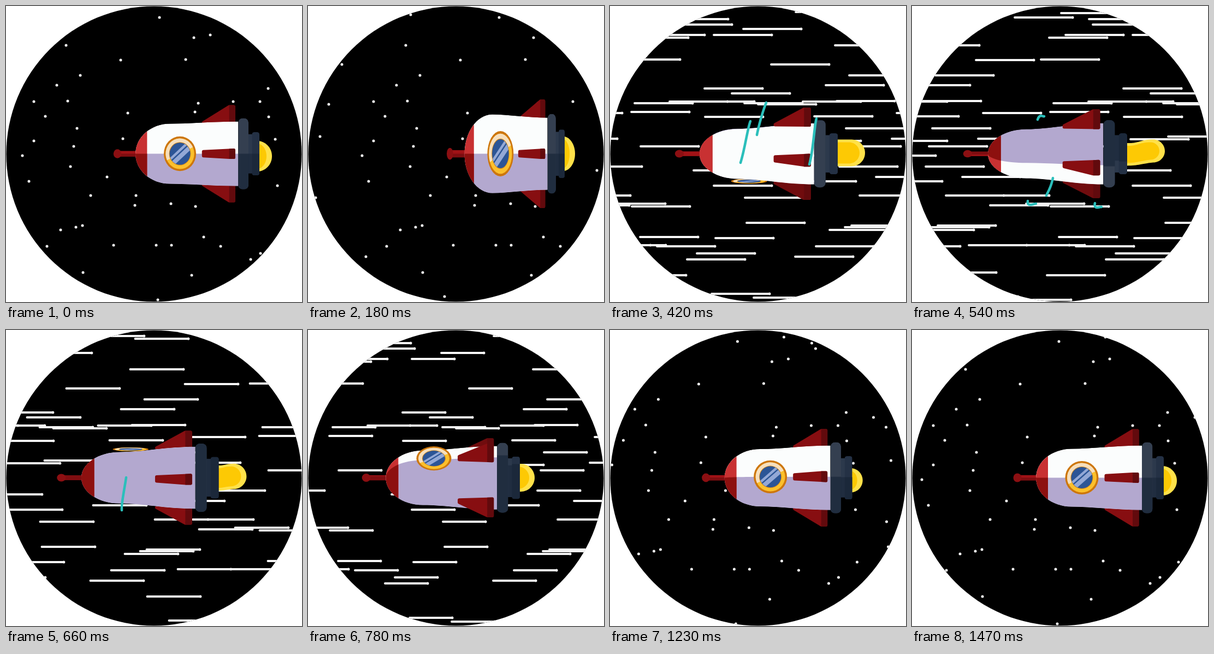
Animation of 542x542 px, one loop 1.53 s. Source, as an HTML page with a canvas:

```html
<!DOCTYPE html>
<html lang="en">
<head>
<meta charset="utf-8">
<title>Rocket</title>
<style>
html, body { margin: 0; width: 100%; height: 100%; overflow: hidden; background: #fff; }
canvas { display: block; width: 542px; height: 542px; }
</style>
</head>
<body>
<canvas id="stage" width="542" height="542"></canvas>
<script>
const ctx = document.getElementById('stage').getContext('2d');
const STEP = 30, LOOP = 1530, CYCLE = 1500, TILE = 609, MID = 270.5;
const TIMES = [0, 180, 420, 540, 780, 990, 1470];

// Monotone cubic track through periodic keys; gain is the growth per cycle.
function track(values, gain = 0) {
  const n = TIMES.length;
  const wrap = i => (i + n) % n;
  const turn = i => Math.floor(i / n);
  const time = i => TIMES[wrap(i)] + turn(i) * CYCLE;
  const value = i => values[wrap(i)] + turn(i) * gain;
  const rate = i => (value(i + 1) - value(i)) / (time(i + 1) - time(i));
  const slope = i => {
    const a = rate(i - 1), b = rate(i);
    return a * b <= 0 ? 0 : 2 * a * b / (a + b);
  };
  return t => {
    let i = n - 1;
    while (TIMES[i] > t) i--;
    const span = time(i + 1) - time(i), u = (t - time(i)) / span;
    const blend = u * u * (3 - 2 * u);
    return value(i) * (1 - blend) + value(i + 1) * blend
      + span * u * (1 - u) * (slope(i) * (1 - u) - slope(i + 1) * u);
  };
}

const pose = {
  drift: track([0, 69, 300, 514, 909, 1129, 1206], 2 * TILE),
  streak: track([0, 0, 110, 110, 82, 0, 0]),
  roll: track([0, 0, 100, 202, 320, 354, 360], 360),
  tail: track([464, 470, 417, 394, 388, 424, 461]),
  stretch: track([0.97, 0.784, 1.082, 1.09, 1.05, 1, 1]),
  front: track([55, 72, 46, 45, 50, 52, 53]),
  back: track([59, 66, 56, 56, 58, 59, 59]),
  flame: track([23, 19, 50, 69, 27, 14, 24]),
  flameR: track([28, 32, 24.5, 21, 25.5, 20, 27]),
  flameY: track([4.5, 0, -1.5, 1, 0, 3, 5.5]),
  bend: track([0, 0, 0, -6, 0, 0, 0])
};

// x, y pairs
const STARS = [
  119,16, 38,11, 366,13, 281,21, 417,24, 424,34, 551,42, 374,53, 497,53, 344,58,
  110,72, 210,99, 329,98, 602,107, 136,127, 93,145, 480,151, 530,160, 113,174, 51,175,
  416,175, 465,175, 352,178, 553,178, 578,180, 346,194, 223,196, 72,202, 481,203, 130,224,
  562,239, 214,243, 493,244, 51,247, 124,257, 363,257, 30,274, 118,294, 259,294, 460,301,
  185,313, 42,321, 497,329, 155,347, 238,347, 554,351, 302,362, 236,365, 347,367, 557,397,
  140,402, 128,405, 100,410, 362,423, 500,425, 197,438, 275,438, 303,438, 75,440, 393,440,
  466,453, 37,459, 448,464, 141,488, 340,493, 493,527, 181,532, 570,534, 278,538
];

const SWIRLS = [
  { delay: 0, points: [[270, 200], [257, 211], [239, 287], [212, 357], [227, 362]] },
  { delay: 0, points: [[298, 165], [286, 177], [269, 236], [258, 315], [246, 347]] },
  { delay: 0, points: [[390, 196], [378, 206], [365, 290], [335, 361], [347, 368]] },
  { delay: 180, points: [[242, 202], [230, 208], [220, 270], [212, 330], [225, 340]] }
];

function ellipse(x, y, rx, ry, color, from = 0, to = Math.PI * 2) {
  ctx.fillStyle = color;
  ctx.beginPath();
  ctx.ellipse(x, y, Math.max(rx, 0), Math.max(ry, 0), 0, from, to);
  ctx.fill();
}

function drawStars(p) {
  ctx.strokeStyle = '#f6f6f6';
  ctx.lineWidth = 3.8;
  ctx.lineCap = 'round';
  for (let i = 0; i < STARS.length; i += 2) {
    const home = (STARS[i] + p.drift) % TILE, y = STARS[i + 1];
    for (const x of [home, home - TILE]) {
      if (p.streak > 4) {
        ctx.beginPath();
        ctx.moveTo(x + 2, y);
        ctx.lineTo(x + p.streak - 2, y);
        ctx.stroke();
      }
      ellipse(x + Math.max(0, p.streak - 2), y, 2.5, 2.5, '#f6f6f6');
    }
  }
}

// Upper edge of the hull for k = -1, lower edge for k = 1.
function addHullEdge(path, p, k) {
  const front = p.front * k, back = p.back * k, q = 0.5523;
  path.moveTo(-234, 0);
  path.bezierCurveTo(-234, front * q, -169 - 65 * q, front, -169, front);
  path.bezierCurveTo(-130, front, -90, back, -40, back);
}

function hullPath(p) {
  const path = new Path2D();
  addHullEdge(path, p, -1);
  path.lineTo(-40, p.back);
  path.bezierCurveTo(-90, p.back, -130, p.front, -169, p.front);
  const q = 0.5523;
  path.bezierCurveTo(-169 - 65 * q, p.front, -234, p.front * q, -234, 0);
  return path;
}

// Fills a shape in two tones divided by the seam that turns with the roll.
function twoTone(p, shape, seam, light, dark) {
  const facing = Math.cos(p.roll) >= 0;
  ctx.save();
  ctx.clip(shape);
  ctx.fillStyle = facing ? light : dark;
  ctx.fill(shape);
  ctx.fillStyle = facing ? dark : light;
  ctx.fill(seam);
  ctx.restore();
}

function seamSide(p) {
  return Math.sin(p.roll) * (Math.cos(p.roll) >= 0 ? 1 : -1);
}

function flatPart(p, x, width, half, radius, light, dark) {
  const shape = new Path2D(), seam = new Path2D();
  shape.roundRect(x, -half, width, half * 2, radius);
  seam.rect(x, half * seamSide(p), width, half * 2);
  twoTone(p, shape, seam, light, dark);
}

function drawHull(p) {
  const shape = hullPath(p), seam = new Path2D();
  addHullEdge(seam, p, seamSide(p));
  seam.lineTo(-40, 120);
  seam.lineTo(-234, 120);
  seam.closePath();
  twoTone(p, shape, seam, '#fbfdfd', '#b3a8cf');
  ctx.save();
  ctx.beginPath();
  ctx.rect(-240, -120, 28, 240);
  ctx.clip();
  twoTone(p, shape, seam, '#c83132', '#8d100f');
  ctx.restore();
}

function drawAntenna(p) {
  const k = p.front / 53;
  flatPart(p, -264, 36, 5 * k, 0, '#a01216', '#7f0d10');
  ellipse(-268, 0, 7.5, 8 * k, '#8c0f12');
}

function drawFin(p, angle) {
  const s = Math.sin(angle), c = Math.abs(Math.cos(angle)), d = s < 0 ? -1 : 1;
  const root = (p.back - 2) * s, tip = 86.5 * p.back / 59 * s, thick = 7 * c;
  const fin = new Path2D();
  fin.moveTo(-106, root - d * thick * 0.6);
  fin.lineTo(-106, root + d * thick * 0.6);
  fin.lineTo(-57, tip + d * thick);
  fin.lineTo(-48, tip + d * thick);
  fin.lineTo(-48, root - d * thick);
  fin.closePath();
  const paint = color => {
    ctx.fillStyle = ctx.strokeStyle = color;
    ctx.fill(fin);
    ctx.stroke(fin);
  };
  ctx.lineWidth = 5;
  ctx.lineJoin = 'round';
  paint(Math.cos(angle) < -0.1 ? '#700c0e' : '#870e11');
  ctx.save();
  ctx.beginPath();
  ctx.rect(-57, -130, 14, 260);
  ctx.clip();
  paint('#620a0d');
  ctx.restore();
}

function drawWindow(p) {
  const c = Math.cos(p.roll);
  if (c < -0.22) return;
  ctx.save();
  ctx.translate(-150, (p.front + 5) * Math.sin(p.roll));
  ctx.scale(1, Math.max(0.13, Math.abs(c)) * p.front / 53);
  ellipse(0, 0, 30.5, 30.5, '#cd760c');
  ellipse(0, 0, 27, 27, '#fbc02c');
  ellipse(0, 0, 27, 27, '#f6dfbd', Math.PI * 0.86, Math.PI * 1.86);
  ellipse(0, 0, 20.5, 20.5, '#d58a1c');
  ellipse(0, 0, 19.5, 19.5, '#2c5596');
  ctx.beginPath();
  ctx.arc(0, 0, 19.5, 0, Math.PI * 2);
  ctx.clip();
  ctx.rotate(-0.72);
  ctx.fillStyle = '#93a8d6';
  ctx.fillRect(-22, -7, 44, 4.5);
  ctx.fillRect(-22, 0, 44, 8);
  ctx.restore();
}

function flameShape(p, length, half, color) {
  const start = p.tail - 6, end = p.tail + length;
  const rx = Math.min(length + 4, half);
  const y = MID + p.flameY, tipY = y + p.bend, neck = end - rx;
  const middle = (start + neck) / 2, q = 0.5523;
  ctx.fillStyle = color;
  ctx.beginPath();
  ctx.moveTo(start, y - half);
  ctx.bezierCurveTo(middle, y - half - p.bend / 2, middle, tipY - half, neck, tipY - half);
  ctx.bezierCurveTo(neck + rx * q, tipY - half, end, tipY - half * q, end, tipY);
  ctx.bezierCurveTo(end, tipY + half * q, neck + rx * q, tipY + half, neck, tipY + half);
  ctx.bezierCurveTo(middle, tipY + half - p.bend / 2, middle, y + half, start, y + half);
  ctx.fill();
}

function drawRocket(p) {
  flameShape(p, p.flame, p.flameR, '#ffe149');
  flameShape(p, Math.max(4, p.flame - 10), p.flameR - 5, '#fdc904');

  const k = p.back / 59;
  const fins = [0, 1, 2, 3].map(i => p.roll + i * Math.PI / 2);
  const inFront = angle => Math.cos(angle) > 0.05;
  ctx.save();
  ctx.translate(p.tail, MID);
  ctx.scale(p.stretch, 1);
  fins.filter(a => !inFront(a)).forEach(a => drawFin(p, a));
  drawAntenna(p);
  if (Math.cos(p.roll) < 0) drawWindow(p);
  drawHull(p);
  if (Math.cos(p.roll) >= 0) drawWindow(p);
  fins.filter(inFront).forEach(a => drawFin(p, a));
  flatPart(p, -24, 18, 36 * k, 3, '#2c394c', '#202d40');
  flatPart(p, -14, 14, 39.5 * k, 4, '#243145', '#1b283a');
  flatPart(p, -40, 19.5, 65 * k, 8, '#343f50', '#202d3f');
  ctx.restore();
}

function curvePoint(points, u) {
  const i = Math.min(Math.floor(u), points.length - 2), f = u - i;
  const at = j => points[Math.max(0, Math.min(points.length - 1, j))];
  return [0, 1].map(axis => {
    const [a, b, c, d] = [-1, 0, 1, 2].map(j => at(i + j)[axis]);
    return b + 0.5 * f * (c - a + f * (2 * a - 5 * b + 4 * c - d + f * (3 * (b - c) + d - a)));
  });
}

function drawSwirls(t) {
  ctx.strokeStyle = '#2bbfbb';
  ctx.lineWidth = 4.6;
  ctx.lineCap = ctx.lineJoin = 'round';
  for (const { delay, points } of SWIRLS) {
    const start = (t - 360 - delay) / 60;
    const from = Math.max(0, start), to = Math.min(points.length - 1, start + 1);
    if (to <= from) continue;
    ctx.beginPath();
    for (let i = 0; i <= 20; i++) ctx.lineTo(...curvePoint(points, from + (to - from) * i / 20));
    ctx.stroke();
  }
}

function draw(t) {
  const p = {};
  for (const name in pose) p[name] = pose[name](t);
  p.roll *= Math.PI / 180;
  ctx.fillStyle = '#fff';
  ctx.fillRect(0, 0, 542, 542);
  ctx.save();
  ctx.beginPath();
  ctx.arc(271, 271, 270.5, 0, Math.PI * 2);
  ctx.clip();
  ctx.fillStyle = '#000';
  ctx.fillRect(0, 0, 542, 542);
  drawStars(p);
  drawRocket(p);
  drawSwirls(t);
  ctx.restore();
}

let begin;
function tick(now) {
  begin ??= now;
  const step = Math.floor((now - begin) % LOOP / STEP);
  draw(Math.min(step, 49) * STEP); // the last pose holds for two steps
  requestAnimationFrame(tick);
}
draw(0);
requestAnimationFrame(tick);
</script>
</body>
</html>
```
